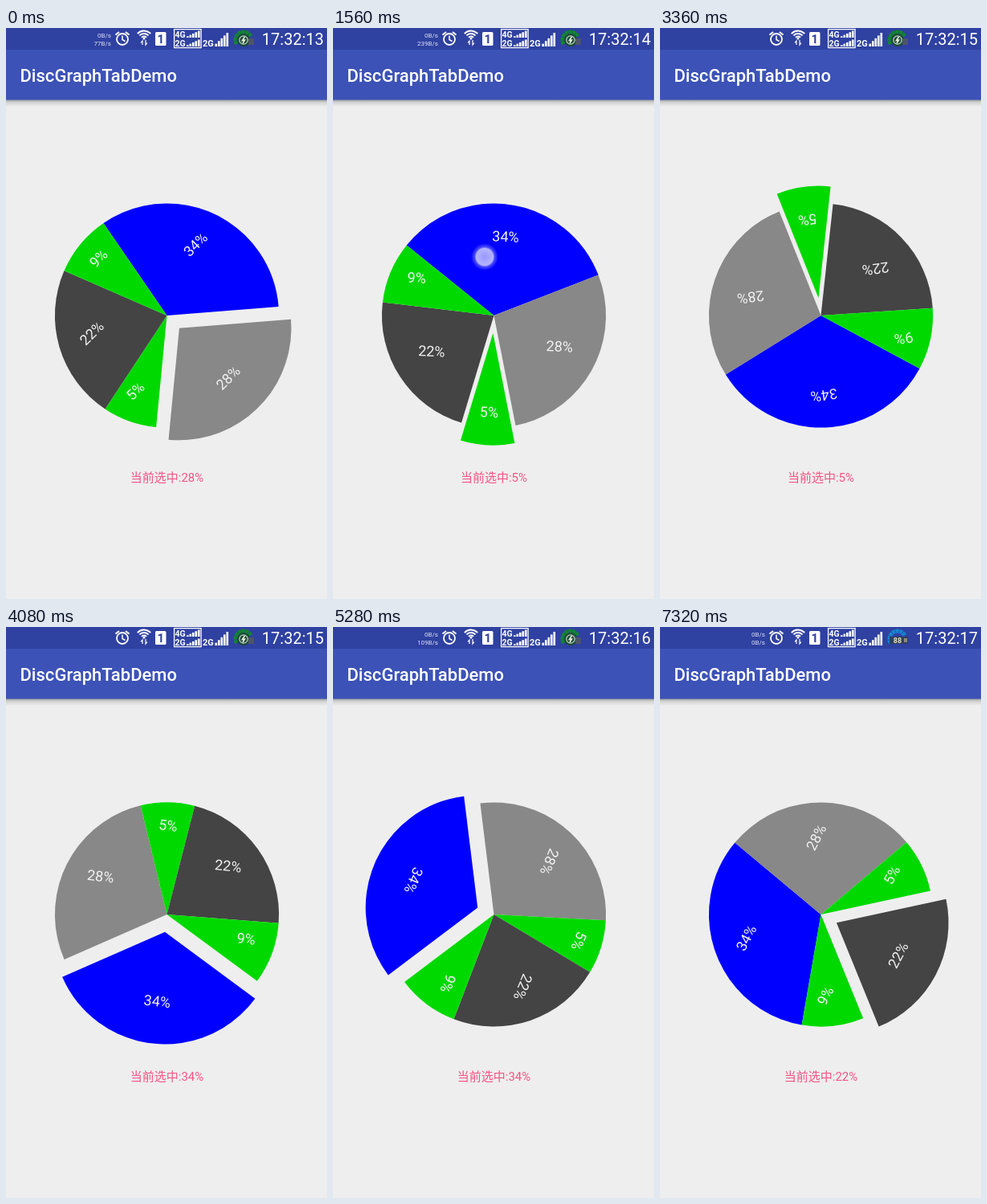
Animation, 400 px wide and 711 px high, one loop 7.44 s. Source, as an HTML page with a canvas:

```html
<!DOCTYPE html>
<html lang="zh">
<head>
<meta charset="utf-8">
<title>Pie chart</title>
<style>
  html, body { margin: 0; width: 100%; height: 100%; overflow: hidden; background: #eee; }
  canvas { display: block; }
</style>
</head>
<body>
<canvas id="stage" width="400" height="711"></canvas>
<script>
const ctx = document.getElementById('stage').getContext('2d');
const LOOP = 7440, STEP = 120, TAU = Math.PI * 2, RAD = Math.PI / 180;
const CENTER = { x: 200.5, y: 358 }, RADIUS = 139.6, POP = 22;
const SANS = 'Roboto, "Noto Sans CJK SC", "Noto Sans CJK", sans-serif';

const slices = [
  { label: '34%', sweep: 120, color: '#00f' },
  { label: '28%', sweep: 100, color: '#888' },
  { label: '5%', sweep: 28, color: '#00d900' },
  { label: '22%', sweep: 80, color: '#444' },
  { label: '9%', sweep: 32, color: '#00d900' }
];
let total = 0;
for (const s of slices) {
  s.mid = total + s.sweep / 2;
  total += s.sweep;
}

// A tap puts the picked slice at the bottom, then turns it evenly to its end angle
const TURN_STEPS = 15.2;
const turns = [
  { from: -20, pick: 1, end: -44.5 },
  { from: 12.75, pick: 2, end: 172.2 },
  { from: 33.4, pick: 0, end: 162 },
  { from: 54, pick: 3, end: -135 }
];
const STEPS_PER_SECOND = 15;
const rates = ['77B/s', '239B/s', '', '109B/s', '0B/s'];

function text(str, x, y, size, color, align = 'left', weight = 400) {
  ctx.font = `${weight} ${size}px ${SANS}`;
  ctx.fillStyle = color;
  ctx.textAlign = align;
  ctx.fillText(str, x, y);
}

function rect(x, y, w, h, color) {
  ctx.fillStyle = color;
  ctx.fillRect(x, y, w, h);
}

function line(points, width = 1.5, color = '#fff') {
  ctx.beginPath();
  points.forEach(p => ctx.lineTo(...p));
  ctx.lineWidth = width;
  ctx.strokeStyle = color;
  ctx.stroke();
}

function arc(x, y, r, a, b, width, color = '#fff') {
  ctx.beginPath();
  ctx.arc(x, y, r, a * RAD, b * RAD);
  ctx.lineWidth = width;
  ctx.strokeStyle = color;
  ctx.stroke();
}

function disc(x, y, r, color) {
  ctx.beginPath();
  ctx.arc(x, y, r, 0, TAU);
  ctx.fillStyle = color;
  ctx.fill();
}

function bars(x, bottom, height) {
  for (let i = 0; i < 5; i++) {
    const h = height * (i + 1) / 5;
    rect(x + i * 3.5, bottom - h, 2.6, h, '#fff');
  }
}

function alarmIcon() {
  arc(145, 14, 7, 0, 360, 1.8);
  line([[145, 9.5], [145, 14.5], [148.5, 16.5]]);
  line([[136.5, 8.5], [141, 5]], 2);
  line([[149, 5], [153.5, 8.5]], 2);
}

function wifiIcon() {
  for (const r of [4, 7.5, 11]) arc(172, 14.5, r, 222, 318, 1.9);
  disc(172, 13, 1.5, '#fff');
  line([[170, 21], [170, 16], [168, 18.5]], 1.2);
  line([[174, 15], [174, 21], [176, 18.5]], 1.2);
}

function simIcons() {
  ctx.beginPath();
  ctx.roundRect(186, 5, 13.5, 17, 1.5);
  ctx.fillStyle = '#fff';
  ctx.fill();
  text('1', 192.7, 19, 15, '#303f9f', 'center', 700);
  ctx.lineWidth = 1.3;
  ctx.strokeStyle = '#fff';
  ctx.strokeRect(209.6, 1.6, 33.5, 23);
  text('4G', 210.5, 11.5, 10.5, '#fff', 'left', 700);
  text('2G', 210.5, 23.3, 10.5, '#fff', 'left', 700);
  bars(225, 12, 8.5);
  bars(225, 23, 8.5);
  text('2G', 245, 23, 11, '#fff', 'left', 700);
  bars(260.5, 23, 17);
}

function batteryIcon(charging) {
  ctx.setLineDash([4, 0.6]);
  arc(296, 15, 10, 150, 335, 5, charging ? '#12852f' : '#1784cc');
  ctx.setLineDash([]);
  if (charging) {
    disc(296, 15, 8, '#1b4a38');
    arc(296, 15, 5.2, 0, 360, 1.2, '#c5d8c7');
    rect(302, 13, 7, 8, '#4d5568');
    line([[297.5, 11], [294.5, 15.5], [297.5, 15], [295, 19]], 1.5, '#f2f2df');
  } else {
    rect(286, 12, 23, 9, '#30405f');
    text('88', 296, 20, 9, '#e4dfb7', 'center', 700);
    rect(304, 14, 4, 5, '#8b8b79');
  }
}

function drawBars(step) {
  const second = Math.floor((step + 9) / STEPS_PER_SECOND);
  const rate = rates[second];
  const shadow = ctx.createLinearGradient(0, 89, 0, 98);
  shadow.addColorStop(0, 'rgba(0,0,0,.36)');
  shadow.addColorStop(0.4, 'rgba(0,0,0,.12)');
  shadow.addColorStop(1, 'rgba(0,0,0,0)');
  rect(0, 89, 400, 9, shadow);
  rect(0, 27, 400, 62.5, '#3c52b6');
  rect(0, 0, 400, 27, '#2f41a1');
  if (rate) {
    text('0B/s', 131, 11.5, 8, '#dfe2f3', 'right');
    text(rate, 131, 21.5, 8, '#dfe2f3', 'right');
  }
  alarmIcon();
  wifiIcon();
  simIcons();
  batteryIcon(second < 4);
  text('17:32:' + (13 + second), 396, 21, 20, '#fff', 'right');
  text('DiscGraphTabDemo', 17.5, 67, 22, '#fff', 'left', 500);
}

function drawPie(step) {
  const { from, pick, end } = turns.filter(t => t.from <= step).pop();
  const angle = end * Math.min(1, (step - from) / TURN_STEPS);
  ctx.save();
  ctx.translate(CENTER.x, CENTER.y);
  ctx.rotate(angle * RAD);
  slices.forEach((s, i) => {
    const mid = (90 + s.mid - slices[pick].mid) * RAD;
    const half = s.sweep / 2 * RAD;
    const reach = RADIUS * (s.sweep < 40 ? 3 / 4 : 2 / 3);
    ctx.save();
    if (i === pick) ctx.translate(POP * Math.cos(mid), POP * Math.sin(mid));
    ctx.beginPath();
    ctx.moveTo(0, 0);
    ctx.arc(0, 0, RADIUS, mid - half, mid + half);
    ctx.fillStyle = s.color;
    ctx.fill();
    text(s.label, reach * Math.cos(mid), reach * Math.sin(mid), 18, '#f2f2f2', 'center');
    ctx.restore();
  });
  ctx.restore();
  text('当前选中:' + slices[pick].label, 200.5, 565, 15, '#f65384', 'center');
}

function drawTouch() {
  const glow = ctx.createRadialGradient(189, 285, 0, 189, 285, 17);
  glow.addColorStop(0, 'rgba(160,160,255,.95)');
  glow.addColorStop(0.62, 'rgba(190,190,255,.95)');
  glow.addColorStop(0.74, 'rgba(120,120,255,.6)');
  glow.addColorStop(1, 'rgba(120,120,255,0)');
  disc(189, 285, 17, glow);
}

function draw() {
  const step = Math.floor(performance.now() % LOOP / STEP);
  rect(0, 0, 400, 711, '#eee');
  drawBars(step);
  drawPie(step);
  if (step === 13 || step === 14) drawTouch();
  requestAnimationFrame(draw);
}
draw();
</script>
</body>
</html>
```
